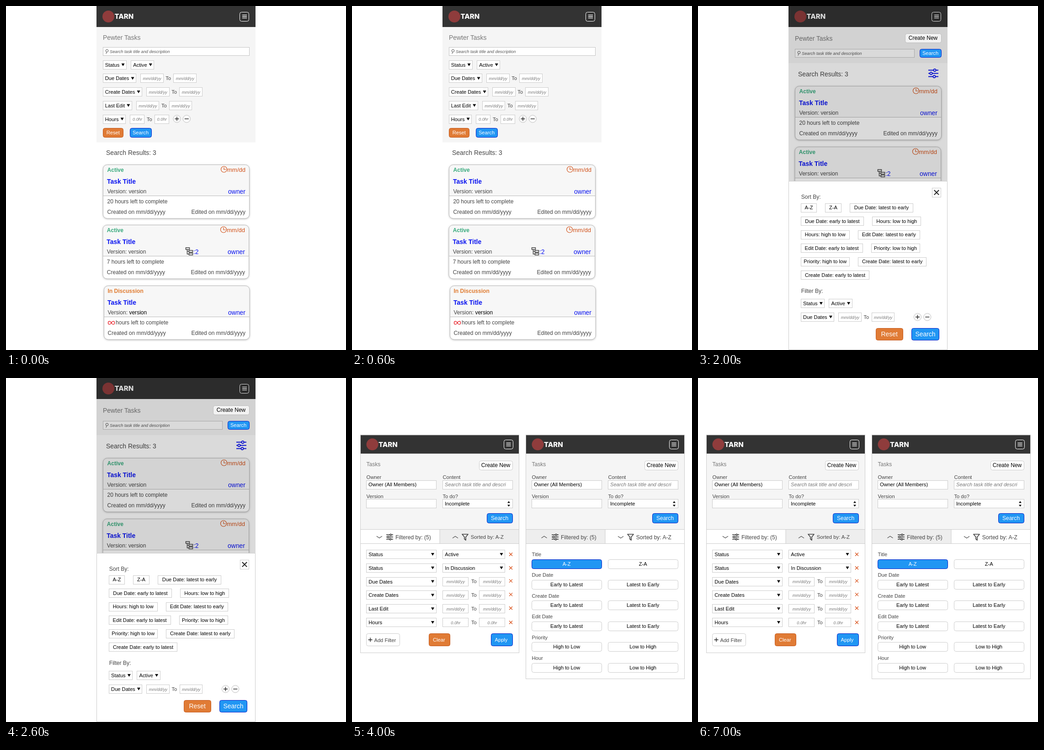
Recreate the animation shown at these times as an HTML page. Size 744 by 753 pixels, loop 9000 ms.

```html
<!DOCTYPE html>
<html lang="en">
<head>
<meta charset="utf-8">
<title>Task list screens</title>
<style>
html, body { margin: 0; width: 100%; height: 100%; overflow: hidden; background: #fff; }
svg { display: block; width: 744px; height: 753px; font-family: "Liberation Sans", Arial, sans-serif; }
.scene { opacity: 0; animation: short 9s step-end infinite; }
.scene.last { animation-name: long; }
.card { filter: drop-shadow(0 1px 2px rgba(0, 0, 0, .3)); }
@keyframes short { 0% { opacity: 1; } 11.1111% { opacity: 0; } }
@keyframes long { 0% { opacity: 1; } 55.5556% { opacity: 0; } }
</style>
</head>
<body>
<svg id="stage" viewBox="0 0 744 753"></svg>
<script>
const S = 9.28, M = 11.14, L = 12.06, XL = 13.92;
const BLUE = '#0a14f0', ORANGE = '#d2521a', INK = '#444', EDGE = '#ccc';
const MID = 'text-anchor="middle"', END = 'text-anchor="end"';
const BOLD = 'font-weight="bold"', ITALIC = 'font-style="italic"';
const KINDS = {
  plain: ['#fff', EDGE, '#000'],
  orange: ['#e07b35', '#c4571b', '#fff'],
  blue: ['#2196f3', '#0a1ec8', '#fff']
};

const pen = document.createElement('canvas').getContext('2d');
const measure = (s, size = M) => {
  pen.font = `${size}px "Liberation Sans", Arial, sans-serif`;
  return pen.measureText(s).width;
};
const snap = v => Math.floor(v) + .5;

// Vertical positions are centres unless a name says top.
const text = (x, cy, s, size = M, fill = '#000', more = '') =>
  `<text x="${x}" y="${cy + size * .36}" font-size="${size}" fill="${fill}" ${more}>${s}</text>`;
const fillRect = (x, y, w, h, fill, more = '') =>
  `<rect x="${x}" y="${y}" width="${w}" height="${h}" fill="${fill}" ${more}/>`;
const path = (d, stroke, width = 1, fill = 'none', more = '') =>
  `<path d="${d}" stroke="${stroke}" stroke-width="${width}" fill="${fill}" ${more}/>`;
const ring = (x, y, r, stroke, width = 1, fill = 'none') =>
  `<circle cx="${x}" cy="${y}" r="${r}" stroke="${stroke}" stroke-width="${width}" fill="${fill}"/>`;

function box(x, cy, w, h, r = 0, fill = '#fff', stroke = EDGE) {
  const l = snap(x), t = snap(cy - h / 2);
  return fillRect(l, t, snap(x + w) - l, snap(cy + h / 2) - t, fill, `rx="${r}" stroke="${stroke}"`);
}
function button(x, cy, w, label, kind = 'plain', { h = 20, size = M, r = 4, dx = 0 } = {}) {
  const [fill, stroke, ink] = KINDS[kind];
  return box(x, cy, w, h, r, fill, stroke) + text(x + w / 2 + dx, cy - .5, label, size, ink, MID);
}
const caret = (x, cy) => `<path d="M${x} ${cy - 3}h7l-3.5 6z"/>`;
const chevron = (x, cy, up, half = 5, color = '#222') =>
  path(`M${x - half} ${cy + (up ? 2 : -2)}l${half} ${up ? -4 : 4}l${half} ${up ? 4 : -4}`, color, 1.3);
const plus = (x, y) => path(`M${x - 4.5} ${y}h9M${x} ${y - 4.5}v9`, '#222', 1.4);
const minus = (x, y) => path(`M${x - 4.5} ${y}h9`, '#222', 1.4);
const cross = (x, y, r, color, width) =>
  path(`M${x - r} ${y - r}l${2 * r} ${2 * r}m0 ${-2 * r}l${-2 * r} ${2 * r}`, color, width);
const plusMinus = (x, y) =>
  ring(x, y, 8, '#bbb', 1, '#fff') + plus(x, y) + ring(x + 21.3, y, 8, '#bbb', 1, '#fff') + minus(x + 21.3, y);
const minusBox = (x, cy) => box(x, cy, 16, 15, 3) + minus(x + 8.5, cy);

function sliders(x, cy, w, color = BLUE) {
  const k = w / 22;
  return [[-7, 14], [0, 6], [7, 13]].map(([dy, kx]) =>
    path(`M${x} ${cy + dy * k}h${w}`, color, 1.2 + .8 * k) +
    ring(x + kx * k, cy + dy * k, 2.6 * k, color, 1 + .8 * k, '#fff')).join('');
}
const funnel = (x, cy, color = BLUE) =>
  path(`M${x} ${cy - 6}h13l-5 6v7l-3 -2.5v-4.5z`, color, 1.7, 'none', 'stroke-linejoin="round"');

function header(x, y, h, w = 347) {
  const cy = y + h / 2;
  return fillRect(x, y, w, h, '#333') +
    `<circle cx="${x + 26}" cy="${cy}" r="13" fill="#8f3c3c"/>` +
    text(x + 39.5, cy, 'TARN', 15, '#fff', 'font-weight="800" style="font-family:Inter,sans-serif"') +
    box(x + 313.5, cy, 20, 20, 4, 'none', '#fff') +
    path(`M${x + 319} ${cy - 3.3}h10m-10 3.3h10m-10 3.3h10`, '#fff', 1.3);
}
const search = (x, cy, w) => box(x, cy, w, 18.5, 0, '#fff', '#c4c4c4') +
  ring(x + 9, cy - 1.5, 2.8, '#555') + path(`M${x + 8} ${cy + 1.3}l-1 4`, '#555') +
  text(x + 15, cy, 'Search task title and description', S, '#555', ITALIC);

const selectWidth = label => measure(label) + 20;
const select = (x, cy, label, w = selectWidth(label)) =>
  box(x, cy, w, 19) + text(x + 4.8, cy, label) + caret(x + w - 11, cy);
const field = (x, cy, w, hint) => box(x, cy, w, 19) + text(x + w / 2 + .3, cy + .5, hint, S, '#777', MID + ITALIC);

// A select followed by a from/to pair; tail receives the right edge.
function range(x, cy, label, tail = () => '') {
  const hours = label === 'Hours', w = hours ? 31 : 49.5, hint = hours ? '0.0hr' : 'mm/dd/yy';
  const a = x + selectWidth(label) + 10, b = a + w + 22.7;
  return select(x, cy, label) + field(a, cy, w, hint) +
    text(a + w + 5.2, cy, 'To', M, INK) + field(b, cy, w, hint) + tail(b + w);
}
const RANGES = ['Due Dates', 'Create Dates', 'Last Edit', 'Hours'];
const statusPair = (x, cy) => select(x, cy, 'Status') + select(x + 61.5, cy, 'Active');

function card(top, dl, dr, { state = 'Active', color = '#36a97c', due = true, left = '20', tree = false, dx = 0 }) {
  const l = 212.5 + dl, r = 532.5 + dr, tx = 221.5 + dx, rx = 524 + (due ? dr : 0), y = snap(top);
  const mid = y + 68;
  let out = `<g class="card">${fillRect(l, y, r - l, 117.5, '#fff', 'rx="9"')}</g>` +
    path(`M${l} ${mid}V${y + 9}q0 -9 9 -9H${r - 9}q9 0 9 9V${mid}z`, 'none', 0, '#f7f7f7') +
    fillRect(l, y, r - l, 117.5, 'none', `rx="9" stroke="#bbb"`) +
    path(`M${l} ${mid}H${r}`, '#bbb') +
    text(tx, y + 11.5, state, L, color, BOLD) +
    text(tx - .5, y + 36.3, 'Task Title', XL, BLUE, BOLD) +
    text(tx, y + 58.5, `Version: <tspan fill="${due ? INK : '#000'}">version</tspan>`, L, INK) +
    text(rx, y + 58, 'owner', XL, BLUE, END) +
    text(tx + (left ? 0 : 17.5), y + 80.5, `${left} hours left to complete`.trim(), L, INK) +
    text(tx, y + 103.3, 'Created on mm/dd/yyyy', L, INK) +
    text(rx, y + 103.3, 'Edited on mm/dd/yyyy', L, INK, END);
  if (due) out += ring(rx - 47, y + 10, 6.5, ORANGE, 1.2) +
    path(`M${rx - 47} ${y + 5.5}v5h4.5`, ORANGE, 1.2) + text(rx, y + 10.5, 'mm/dd', 13, ORANGE, END);
  if (tree) out += path(`M393.5 ${y + 49.5}h8v4h-8zM396.5 ${y + 53.5}v10h4m-4 -6h4` +
    `M400.5 ${y + 55.5}h8v4h-8zM400.5 ${y + 61.5}h8v4h-8z`, INK, 1.5) + text(410, y + 58, ':2', XL, BLUE);
  if (!left) out += path(`M${tx + 8} ${y + 81}c2.5 -4.5 7 -4.5 7 0s-4.5 4.5 -7 0s-7 -4.5 -7 0s4.5 4.5 7 0`, '#e8222a', 1.3);
  return out;
}
const cards = top => card(top, 0, 0, {}) +
  card(top + 132.5, -.5, -1, { left: '7', tree: true, dx: -.7 }) +
  card(top + 265, 2, .5, { state: 'In Discussion', color: '#e07b30', due: false, left: '', dx: 1 });

const fullScreen = () => header(198, 0, 46, 348) + fillRect(198, 46, 348, 252.5, '#f5f5f5') +
  text(212, 69, 'Pewter Tasks', XL, '#777') + search(212, 99.5, 320) +
  statusPair(212, 128.8) +
  RANGES.map((label, i) => range(212, 158.4 + i * 29.7, label)).join('') + plusMinus(374, 247) +
  button(212, 277, 44.5, 'Reset', 'orange') + button(271, 277, 47, 'Search', 'blue') +
  text(219, 321, 'Search Results: 3', XL, INK) + cards(347);

const dimmedScreen = () => header(198, 0, 46, 348) + fillRect(198, 46, 348, 79, '#f5f5f5') +
  text(212, 70.5, 'Pewter Tasks', XL, '#777') + search(212, 103.3, 261.5) +
  text(219, 149, 'Search Results: 3', XL, INK) + sliders(504, 147.5, 22) + cards(175.6) +
  fillRect(198, 0, 348, 753, '#000', 'opacity=".145"') +
  box(453, 70, 79, 20, 4, '#f2f2f2', '#bbb') + text(492.5, 69.7, 'Create New', L, '#000', MID) +
  button(485, 103.5, 47, 'Search', 'blue', { h: 18.5 });

const CHIPS = [
  [['A-Z', 34.5], ['Z-A', 34.5], ['Due Date: latest to early', 138.5]],
  [['Due Date: early to latest', 137.5], ['Hours: low to high', 106]],
  [['Hours: high to low', 106], ['Edit Date: latest to early', 135]],
  [['Edit Date: early to latest', 134.7], ['Priority: low to high', 106]],
  [['Priority: high to low', 106], ['Create Date: latest to early', 149.5]],
  [['Create Date: early to latest', 149.5]]
];
function sortFilter(x, top, gaps, closeX, closeY, plusX) {
  let n = 0;
  const chips = CHIPS.map((row, i) => {
    let at = x;
    return row.map(([label, w], j) => {
      if (j) at += gaps[n++ % gaps.length];
      const out = button(at, top + i * 29.55, w, label, 'plain', { h: 19, r: 0 });
      at += w;
      return out;
    }).join('');
  }).join('');
  return box(closeX, closeY, 19.5, 20) + cross(closeX + 10, closeY, 5.2, '#222', 2) +
    text(x + .5, top - 24.3, 'Sort By:', L, INK) + chips +
    text(x + .5, top + 182.5, 'Filter By:', L, INK) + statusPair(x, top + 209.5) +
    range(x, top + 239.2, 'Due Dates') + plusMinus(plusX, top + 239.2);
}
const popup = () => dimmedScreen() + fillRect(213, 206, 318.5, 368, '#fff', 'rx="9"') +
  sortFilter(239.2, 263.5, [9.5, 12.5, 12, 11, 11, 11], 503, 229.3, 466.5) +
  button(239.2, 532.3, 44, 'Reset', 'orange') + button(298, 532.3, 47, 'Search', 'blue');
const sheet = () => dimmedScreen() + box(198.5, 568, 347, 369, 2, '#fff', '#ccc') +
  sortFilter(225.3, 441.6, [19], 512, 408.2, 480.5) +
  button(389, 718, 59.5, 'Reset', 'orange', { h: 26, size: XL }) +
  button(467.5, 718, 60, 'Search', 'blue', { h: 26, size: XL });

function panel(x, top, bottom, headH, grayBottom) {
  return box(x, (top + bottom) / 2, 347, bottom - top) +
    fillRect(x + .5, top + headH, 346.5, grayBottom - top - headH, '#f5f5f5') +
    header(x + .5, top + .5, headH, 346.5) + path(`M${x + .5} ${top}V${bottom}M${x + 347.5} ${top}V${bottom}`, EDGE);
}
function compactTop(x, bottom, edge, notch, filter, sort) {
  const tip = edge - (notch - x > 100 ? 14 : 9), half = notch - x > 100 ? 8.5 : 6.5;
  return panel(x, 127, bottom, 40, edge) +
    text(x + 13.5, 191.7, 'Pewter Tasks', L, '#777') +
    button(x + 254, 192.5, 79, 'Create New', 'plain', { size: L }) + search(x + 13.5, 225, 261.5) +
    button(x + 286, 225, 47, 'Search', 'blue', { h: 18, size: S, dx: -2 }) +
    box(x + 13.5, 260.5, filter.w, 20.5, 4) + sliders(x + 19, 260.5, 16) +
    text(x + 39, 260.5, filter.label, M, INK) + chevron(x + filter.chev, 261, filter.up) +
    box(x + sort.x, 260.5, sort.w, 20.5, 4) + funnel(x + sort.x + 6, 260.5) +
    text(x + sort.x + 24.7, 260.5, `${sort.label} <tspan fill="#000">A-Z</tspan>`, M, INK) +
    chevron(x + sort.chev, 261, sort.up) +
    path(`M${x + .5} ${edge}H${notch - half}L${notch} ${tip}L${notch + half} ${edge}H${x + 347.5}`, EDGE, 1, '#fff');
}
const GROUPS = ['Title', 'Due Date', 'Create Date', 'Edit Date', 'Priority', 'Hour'];
const choices = i => i < 1 ? ['A-Z', 'Z-A'] : i < 4 ? ['Early to Latest', 'Latest to Early'] : ['High to Low', 'Low to High'];

function compactSort() {
  const rows = GROUPS.map((name, i) => {
    const [a, b] = choices(i).map(s => i ? s.toLowerCase() : s);
    const w = i < 1 ? 35 : i < 4 ? 84 : 70, y = i * 46.35;
    return text(36, 306 + y, name, M, INK) + button(36, 328.5 + y, w, a) +
      button(36 + w + (i ? 10 : 14), 328.5 + y, w, b);
  }).join('');
  return compactTop(18, 625, 284.5, 220.5,
    { w: 93, label: 'Filter by:', chev: 95.5, up: false },
    { x: 126, w: 110.5, label: 'Sort by:', chev: 223, up: true }) + rows +
    button(36, 596, 44.5, 'Clear', 'orange') + button(118, 596, 47, 'Apply', 'blue');
}
const compactFilter = () => compactTop(380, 504, 280.5, 447,
    { w: 100.5, label: 'Filtered by:', chev: 103.5, up: true },
    { x: 128.5, w: 115.5, label: 'Sorted by:', chev: 235.5, up: false }) +
  statusPair(398, 320) + minusBox(519.5, 320) +
  RANGES.map((label, i) => range(398, 349.8 + i * 29.6, label, right => minusBox(right + 10, 349.8 + i * 29.6))).join('') +
  box(398, 475.7, 69, 19.5, 3) + plus(407, 475.5) + text(415, 475.7, 'Add Filter', M, INK) +
  button(483.5, 475.7, 44.5, 'Clear', 'orange') + button(565, 475.7, 47, 'Apply', 'blue');

function formTop(x, bottom, sorting) {
  const a = x + 13.5, b = x + 180.5, w = 152.5, cx = x + 325;
  const tabX = x + (sorting ? 0 : 173.5);
  return panel(x, 124.7, bottom, 40.3, 331.5) +
    text(a, 188.5, 'Tasks', L, '#777') + button(x + 260, 191.3, 73, 'Create New', 'plain', { size: L }) +
    text(a, 217.3, 'Owner', M, INK) + text(b, 217.3, 'Content', M, INK) +
    box(a, 233.5, w, 19) + text(a + 4.5, 233, 'Owner (All Members)') +
    box(b, 233.5, w, 19) + text(b + 4.5, 233, 'Search task title and descri', M, '#777', ITALIC) +
    text(a, 259, 'Version', M, INK) + text(b, 259, 'To do?', M, INK) +
    box(a, 275.3, w, 19) + box(b, 275.3, w, 19) + text(b + 4.5, 275, 'Incomplete') +
    `<path d="M${cx - 3} 273.5h6l-3 -4zM${cx - 3} 277.5h6l-3 4z"/>` +
    button(x + 277, 306.8, 56, 'Search', 'blue', { h: 21, size: L }) +
    fillRect(x + .5, 331.5, 347, 31, '#fff', `stroke="${EDGE}"`) +
    fillRect(tabX + .5, 331.5, 173.5, 31, '#eee', `stroke="${EDGE}"`) +
    chevron(x + (sorting ? 40.5 : 41.8), 348.3, sorting, 6, '#555') + sliders(x + 57, 348, 15, INK) +
    text(x + 77, 348.5, 'Filtered by: (5)', L, INK) +
    chevron(x + 208, 348.5, !sorting, 6, '#555') + funnel(x + 223, 348, INK) +
    text(x + 241.8, 348.3, 'Sorted by: A-Z', sorting ? L : 11.3, INK);
}
function formFilter() {
  const rows = ['Status', 'Status', ...RANGES].map((label, i) => {
    const y = 386 + i * 29.8, hint = label === 'Hours' ? '0.0hr' : 'mm/dd/yy';
    const value = i < 2 ? select(198.5, y, ['Active', 'In Discussion'][i], 136)
      : field(198.5, y, 56, hint) + text(261, y - .3, 'To', M, INK) + field(278.5, y, 56, hint);
    return select(31.5, y, label, 152.5) + value + cross(347.5, y - (i > 1 && i < 5 ? 1.5 : 0), 3.5, '#d9541e', 1.3);
  }).join('');
  return formTop(18, 601, false) + rows +
    box(31.5, 573, 72.5, 26.5, 4) + plus(40, 573) + text(48.5, 574, 'Add Filter', M, INK) +
    button(168.3, 573, 46, 'Clear', 'orange', { h: 27, dx: -1 }) +
    button(304, 573, 47, 'Apply', 'blue', { h: 27, dx: -1 });
}
const formSort = () => formTop(380, 658, true) + GROUPS.map((name, i) => {
  const y = i * 45.4, [a, b] = choices(i);
  return text(393.5, 386 + y, name, M, INK) + button(393.3, 407 + y, 152.7, a, i ? 'plain' : 'blue') +
    button(560.3, 407 + y, 152.7, b);
}).join('');

const scenes = [
  fullScreen(), popup(), sheet(),
  compactSort() + compactFilter(),
  formFilter() + formSort()
];
document.getElementById('stage').innerHTML = scenes.map((body, i) =>
  `<g class="scene${i === scenes.length - 1 ? ' last' : ''}" style="animation-delay:${i ? i - 9 : 0}s">${body}</g>`).join('');
</script>
</body>
</html>
```
